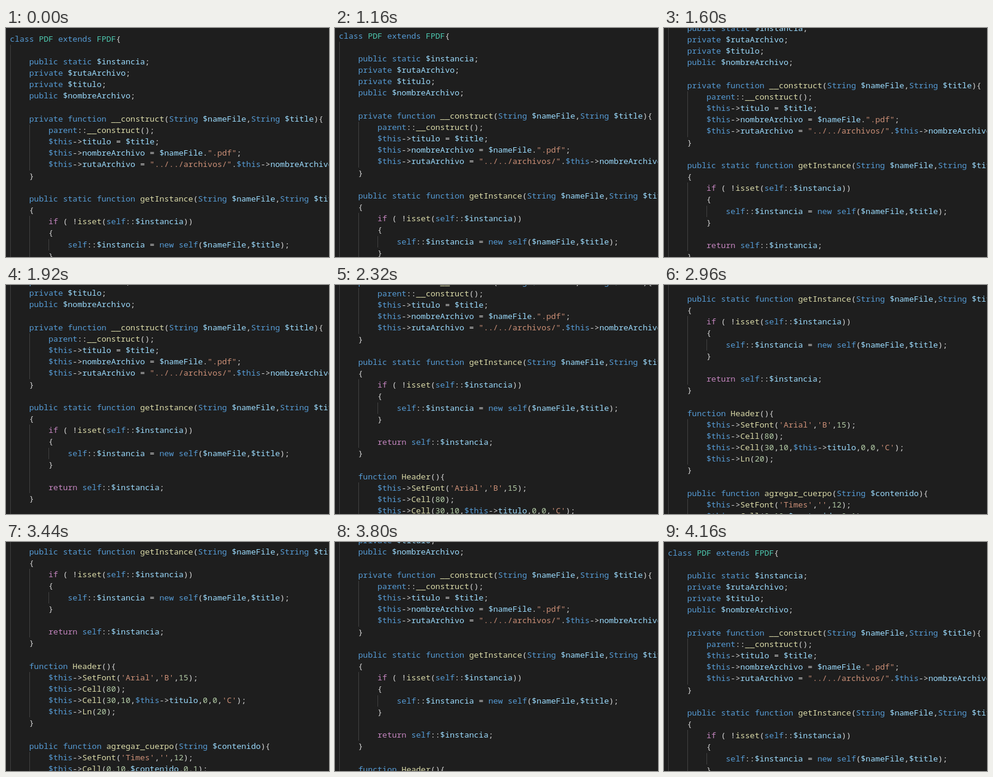
Recreate the animation shown at these times as an HTML page. Size 540 px wide and 384 px high, loop 4360 ms.

```html
<!DOCTYPE html>
<html lang="es">
<head>
<meta charset="utf-8">
<title>Scrolling code</title>
<style>
  html, body { margin: 0; width: 100%; height: 100%; overflow: hidden; background: #1e1e1e; }
  svg { display: block; width: 540px; height: 384px; }
  text { font: 13.45px "Noto Sans Mono", "DejaVu Sans Mono", monospace; white-space: pre; fill: #d4d4d4; }
  .keyword { fill: #569cd6; }
  .control { fill: #c586c0; }
  .type { fill: #4ec9b0; }
  .call { fill: #dcdcaa; }
  .name { fill: #9cdcfe; }
  .string { fill: #ce9178; }
  .number { fill: #b5cea8; }
  .guide { fill: #404040; }
</style>
</head>
<body>
<svg viewBox="0 0 540 384"><g id="page"></g></svg>
<script>
const source = `class PDF extends FPDF{

    public static $instancia;
    private $rutaArchivo;
    private $titulo;
    public $nombreArchivo;

    private function __construct(String $nameFile,String $title){
        parent::__construct();
        $this->titulo = $title;
        $this->nombreArchivo = $nameFile.".pdf";
        $this->rutaArchivo = "../../archivos/".$this->nombreArchivo;
    }

    public static function getInstance(String $nameFile,String $title)
    {
        if ( !isset(self::$instancia))
        {
            self::$instancia = new self($nameFile,$title);
        }

        return self::$instancia;
    }

    function Header(){
        $this->SetFont('Arial','B',15);
        $this->Cell(80);
        $this->Cell(30,10,$this->titulo,0,0,'C');
        $this->Ln(20);
    }

    public function agregar_cuerpo(String $contenido){
        $this->SetFont('Times','',12);
        $this->Cell(0,10,$contenido,0,1);`;

const LOOP = 4360, STEP = 40, LINE = 19.17, LEFT = 6.5, BASELINE = 22.5;
const page = document.getElementById('page');

const token = new RegExp([
  '(?<string>"[^"]*"|\'[^\']*\')',
  '(?<keyword>\\$this\\b|\\b(?:class|extends|public|private|static|function|parent|self|new|String)\\b)',
  '(?<control>\\b(?:if|return)\\b)',
  '(?<type>\\bF?PDF\\b)',
  '(?<number>\\b\\d+\\b)',
  '(?<call>\\b\\w+(?=\\())',
  '(?<name>\\$?\\b\\w+)'
].join('|'), 'g');

function add(parent, tag, attrs, content) {
  const el = document.createElementNS('http://www.w3.org/2000/svg', tag);
  for (const key in attrs) el.setAttribute(key, attrs[key]);
  if (content) el.textContent = content;
  return parent.appendChild(el);
}

// Vertical indent guide covering the given rows.
function guide(x, first, last) {
  const top = y => Math.round(8.5 + y * LINE);
  add(page, 'rect', { class: 'guide', x, y: top(first), width: 1, height: top(last + 1) - top(first) });
}

guide(7, 1, 40);
for (const [first, last] of [[8, 11], [16, 21], [25, 28], [32, 36]]) guide(39, first, last);
guide(71, 18, 18);

source.split('\n').forEach((line, row) => {
  const text = add(page, 'text', { x: LEFT, y: Math.round(BASELINE + row * LINE) });
  let end = 0;
  for (const match of line.matchAll(token)) {
    text.append(line.slice(end, match.index));
    const kind = Object.keys(match.groups).find(key => match.groups[key]);
    add(text, 'tspan', { class: kind }, match[0]);
    end = match.index + match[0].length;
  }
  text.append(line.slice(end));
});

// Scroll position as [ms, px], joined by a monotone cubic curve.
const path = [
  [0, 0], [1120, 0], [1160, 5], [1360, 31], [1520, 51], [1600, 56], [1720, 56],
  [1920, 81], [2320, 157], [2680, 215], [2840, 250], [3200, 278], [3400, 278],
  [3440, 270], [3700, 150], [3960, 28], [4160, 0], [LOOP, 0]
];
const slope = i => (path[i + 1][1] - path[i][1]) / (path[i + 1][0] - path[i][0]);

function tangent(i) {
  if (i === 0 || i === path.length - 1) return 0;
  const a = slope(i - 1), b = slope(i);
  return a * b > 0 ? 2 * a * b / (a + b) : 0;
}

function scrollAt(t) {
  const i = path.findIndex((p, k) => t < path[k + 1][0]);
  const [t0, y0] = path[i], [t1, y1] = path[i + 1];
  const d = t1 - t0, u = (t - t0) / d, v = 1 - u;
  return y0 * v * v * (1 + 2 * u) + y1 * u * u * (1 + 2 * v)
    + d * u * v * (tangent(i) * v - tangent(i + 1) * u);
}

function draw(now) {
  const t = Math.floor((now % LOOP) / STEP) * STEP;
  page.setAttribute('transform', `translate(0 ${-Math.round(scrollAt(t))})`);
}

const start = performance.now();
function tick() {
  draw(performance.now() - start);
  requestAnimationFrame(tick);
}
tick();
</script>
</body>
</html>
```
